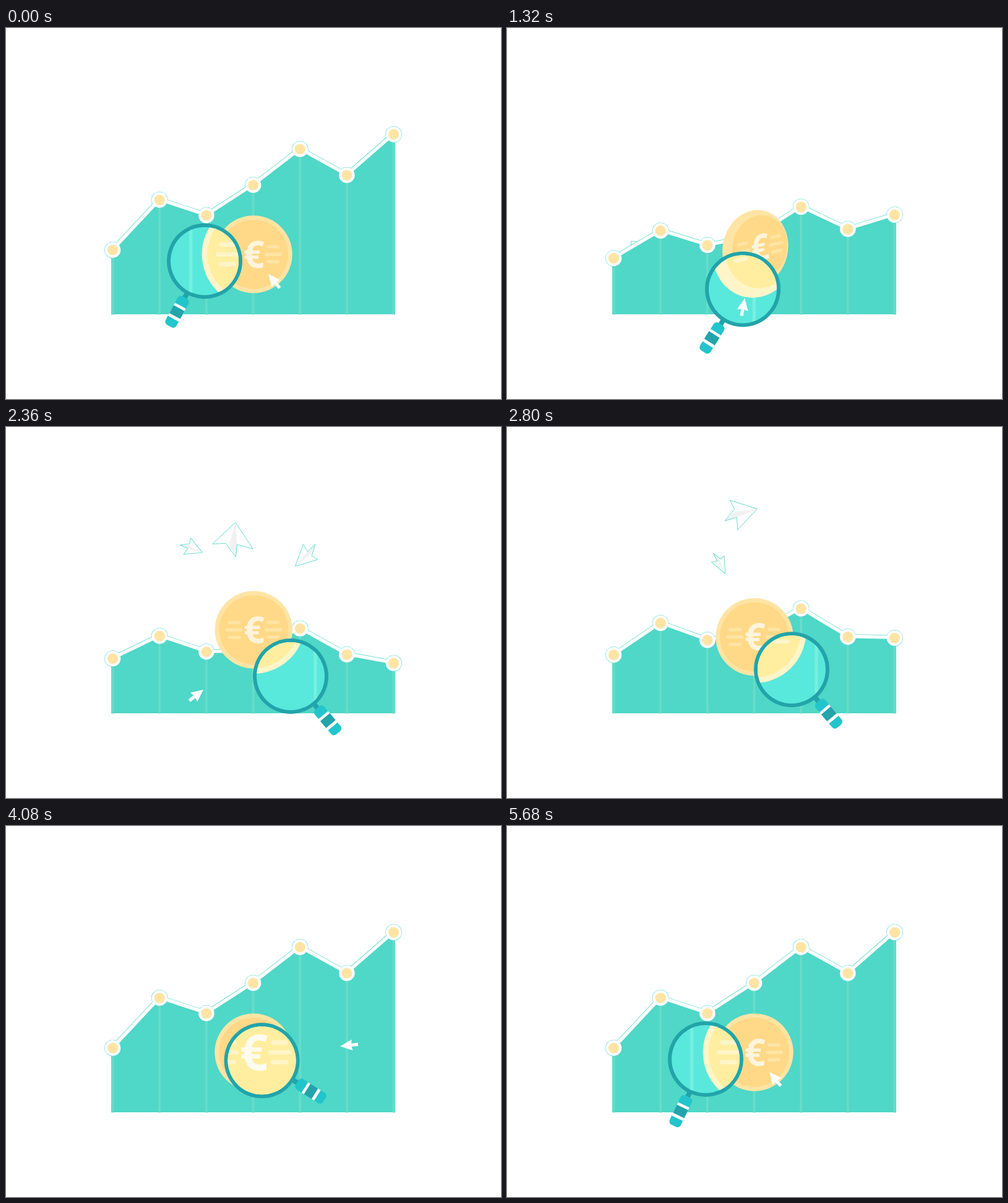
Recreate the animation shown at these times as an HTML page with a canvas. Size 800 by 600 pixels, loop 5720 ms.

```html
<!DOCTYPE html>
<html lang="en">
<head>
<meta charset="utf-8">
<title>Chart and coin</title>
<style>
  html, body { margin: 0; width: 100%; height: 100%; overflow: hidden; background: #fff; }
  canvas { display: block; }
</style>
</head>
<body>
<canvas id="stage" width="800" height="600"></canvas>
<script>
const ctx = document.getElementById('stage').getContext('2d');
const LOOP = 5720, STEP = 40, BASE = 463, TAU = Math.PI * 2;
const ZOOM = 1.33, HOME = { x: 400, y: 366 };
const TEAL = '#4fd7c7', RING = '#22a4aa', HANDLE = '#22c5cb';

const normal = { rim: '#ffe4a4', face: '#ffd987', euro: '#fff4dc', star: '#fffbea' };
const zoomed = { rim: '#fff5c9', face: '#ffee9f', euro: '#fffbee', star: '#ffffff' };

const highs = [359, 278, 303, 254, 196, 238, 172];
const lows = [374.5, 338, 363.5, 364, 326, 368, 382];
const columnX = i => 172.5 + i * 75.67;

const planes = [
  { start: 1300, end: 3900, pace: 0.6, x: 293, reach: 94, floor: 375, rise: 178, turn: -152, length: 27, span: 27 },
  { start: 1400, end: 2900, pace: 0.6, x: 540, reach: -98, floor: 372, rise: 218, turn: -186, length: 34, span: 44 },
  { start: 1800, end: 3700, pace: 0.9, x: 395, reach: 48, floor: 318, rise: 189, turn: -183, length: 39, span: 45 }
];

const stars = [
  { x: 347, y: 343, size: 7, peak: 3360 },
  { x: 364, y: 414, size: 10, peak: 3360 },
  { x: 455, y: 347, size: 10, peak: 3360 },
  { x: 429, y: 317, size: 10, peak: 4720 },
  { x: 461, y: 368, size: 13, peak: 4720 }
];

const rad = d => d * Math.PI / 180;
const part = (t, from, to) => Math.max(0, Math.min(1, (t - from) / (to - from)));
const cubic = u => u < 0.5 ? 4 * u ** 3 : 1 - 4 * (1 - u) ** 3;

// Eased 0 to 1, and 0 to 1 and back
function move(t, from, to) {
  const u = part(t, from, to);
  return u * u * (3 - 2 * u);
}
const bump = (t, from, to) => Math.sin(Math.PI * part(t, from, to)) ** 2;

function shape(pts, fill) {
  ctx.beginPath();
  pts.forEach(p => ctx.lineTo(p[0], p[1]));
  ctx.closePath();
  ctx.fillStyle = fill;
  ctx.fill();
}

function line(pts, color, width) {
  ctx.beginPath();
  pts.forEach(p => ctx.lineTo(p[0], p[1]));
  ctx.strokeStyle = color;
  ctx.lineWidth = width;
  ctx.stroke();
}

function disc(x, y, r, fill) {
  ctx.beginPath();
  ctx.arc(x, y, r, 0, TAU);
  ctx.fillStyle = fill;
  ctx.fill();
}

function rect(x, y, w, h, fill, r = 0) {
  ctx.beginPath();
  ctx.roundRect(x, y, w, h, r);
  ctx.fillStyle = fill;
  ctx.fill();
}

// Draws in a moved and turned frame
function placed(x, y, degrees, paint) {
  ctx.save();
  ctx.translate(x, y);
  ctx.rotate(rad(degrees));
  paint();
  ctx.restore();
}

function drawPlane(p, t) {
  if (t <= p.start || t >= p.end) return;
  const u = part(t, p.start, p.end) ** p.pace;
  const x = p.x - p.reach * Math.cos(Math.PI * u);
  const y = p.floor - p.rise * Math.sin(Math.PI * u);
  const heading = 300 * u + p.turn;
  const half = p.span * (1 - 0.8 * u);
  // Weights of the right and left wing tips
  const at = (r, l) => [-(r + l) * p.length, (r - l) * half];
  const tip = at(0, 0), right = at(0.55, 0.35), keel = at(0.82, 0.6), left = at(0.28, 0.63);
  const outline = [tip, at(1, 0), right, keel, left, at(0, 1), tip];
  placed(x, y, p.reach > 0 ? heading : 180 - heading, () => {
    shape(outline, '#fff');
    shape([tip, right, keel, at(0.38, 0.55)], '#f2f0f1');
    line(outline, '#5fdccb', 0.9);
  });
}

function drawChart(t) {
  const pts = highs.map((high, i) => {
    const down = cubic(part(t, 20 + i * 42, 1948 + i * 42));
    const up = cubic(part(t, 2360 + i * 15, 3320 + i * 15));
    return [columnX(i), high + (lows[i] - high) * (down - up)];
  });
  const first = pts[0], last = pts[pts.length - 1];
  shape([[170, BASE], [170, first[1]], ...pts, [629, last[1]], [629, BASE]], TEAL);
  pts.forEach(([x, y]) => rect(x - 2, y, 4, BASE + 0.5 - y, '#66dcc9'));

  const ridge = pts.map(([x, y]) => [x, y - 1]);
  ctx.lineJoin = 'round';
  line(ridge, TEAL, 7);
  pts.forEach(([x, y]) => disc(x, y, 13.3, TEAL));
  line(ridge, '#fff', 5.6);
  pts.forEach(([x, y]) => {
    disc(x, y, 12.8, '#fff');
    disc(x, y, 8.6, '#ffe4a4');
  });
}

function drawCoin(t, tone) {
  const lift = move(t, 1000, 1890) - move(t, 2500, 3320);
  const lean = bump(t, 250, 2100), spin = bump(t, 250, 2500);
  const axis = 25 * (1 - move(t, 920, 1720));
  placed(HOME.x + 6 * lift * spin - 2 * bump(t, 350, 1500),
         HOME.y - 38 * lift + 8 * bump(t, 350, 1500), axis, () => {
    ctx.scale(1 - 0.17 * lean, 1);
    ctx.rotate(rad(-axis - 9 * spin));
    disc(0, 0, 62.7, tone.rim);
    ctx.translate(8.5 * spin, 0);
    disc(0, 0, 56 - 3.5 * spin, tone.face);
    for (const side of [-1, 1]) {
      for (const row of [-1, 0, 1]) {
        const near = row ? 21 : 18, width = row ? 21 : 28;
        rect(side > 0 ? near : -near - width, row * 12 - 2.7, width, 5.4, tone.rim, 2.7);
      }
    }
    ctx.fillStyle = tone.euro;
    ctx.font = 'bold 60px "Open Sans", "Noto Sans", sans-serif';
    ctx.textAlign = 'center';
    ctx.fillText('€', 0.5, 21.5);
  });
}

function drawStars(t, tone) {
  for (const { x, y, size, peak } of stars) {
    const r = size * Math.min(1, 1.8 * Math.max(0, 1 - Math.abs(t - peak) / 340));
    const pts = Array.from({ length: 8 }, (_, i) => {
      const a = rad(14 + i * 45), d = i % 2 ? r * 0.48 : r;
      return [x + d * Math.cos(a), y + d * Math.sin(a)];
    });
    shape(pts, tone.star);
  }
}

// The handle swings out across the loop's seam, so its clock starts at 4720
function handleAngle(t) {
  const s = (t + 1000) % LOOP;
  return 24 + 129.5 * Math.sin(Math.PI / 2 * part(s, 0, 1920))
    - 103.5 * move(s, 1900, 3050) - 26 * move(s, 4000, LOOP);
}

function drawLens(t) {
  const x = 321 + 139 * (cubic(part(t, 640, 2068)) - move(t, 3152, 5546));
  const y = 377 + 54 * (move(t, 250, 1520) - move(t, 720, 3920)) + 19 * bump(t, 3900, 5500);
  placed(x, y, handleAngle(t), () => {
    rect(58, -4, 14, 8, RING);
    rect(67, -10, 52.5, 20, HANDLE, 6);
    rect(82, -10, 24, 20, '#fff');
    rect(86.5, -10, 14.5, 20, RING);
  });

  disc(x, y, 61, RING);
  ctx.save();
  disc(x, y, 55, '#59e8dc');
  ctx.clip();
  ctx.translate(HOME.x, HOME.y);
  ctx.scale(ZOOM, ZOOM);
  ctx.translate(-HOME.x, -HOME.y);
  highs.forEach((_, i) => rect(columnX(i) - 2, 150, 4, 330, '#76f0df'));
  drawCoin(t, zoomed);
  drawStars(t, zoomed);
  ctx.restore();
}

// The pointer circles the coin and always aims at it
function drawCursor(t) {
  const left = move(t, 708, 1864), right = move(t, 2400, 3340), back = move(t, 4440, 5210);
  const angle = 53 + 91 * left - 148 * right + 57 * back - 49 * 0;
  const r = 40 + 60 * left + 13 * right - 73 * back + 29 * bump(t, 3400, 5000);
  const x = HOME.x + r * Math.cos(rad(angle)), y = HOME.y + r * Math.sin(rad(angle));
  placed(x, y, angle + 178, () => {
    shape([[0, 0], [-19.5, -9], [-18.5, -2.6], [-29, -2.6], [-29, 2.6], [-18.5, 2.6], [-19.5, 9]], '#fff');
  });
}

function draw(t) {
  ctx.fillStyle = '#fff';
  ctx.fillRect(0, 0, 800, 600);
  planes.forEach(p => drawPlane(p, t));
  drawChart(t);
  drawCoin(t, normal);
  drawStars(t, normal);
  drawLens(t);
  drawCursor(t);
}

const start = performance.now();
function tick() {
  const t = (performance.now() - start) % LOOP;
  draw(Math.floor(t / STEP) * STEP);
  requestAnimationFrame(tick);
}
tick();
</script>
</body>
</html>
```
